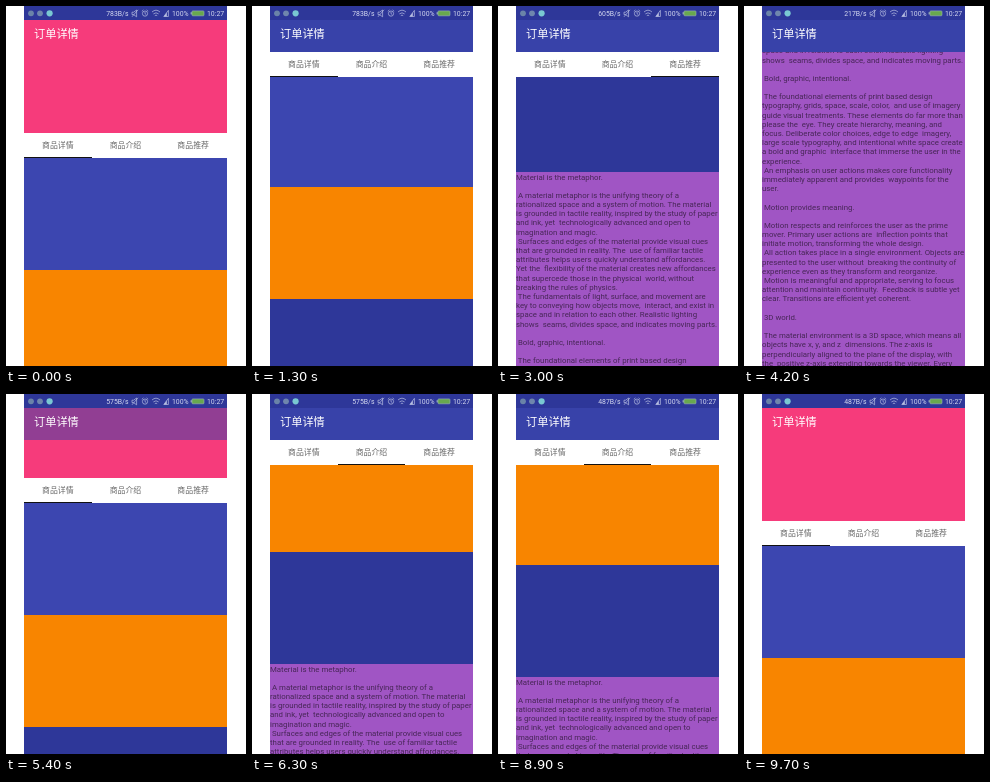
An HTML page for the animation above (9.8 s loop, 240 px wide and 360 px high).

```html
<!DOCTYPE html>
<html lang="zh-CN">
<head>
<meta charset="utf-8">
<title>订单详情</title>
<style>
html, body { margin: 0; width: 100%; height: 100%; overflow: hidden; background: #fff; }
#phone { position: absolute; left: 18px; top: 0; width: 203px; height: 360px; overflow: hidden; background: #fff;
  font-family: Roboto, "Noto Sans CJK SC", "Noto Sans CJK", sans-serif; }
#phone div, #phone pre, #phone svg { position: absolute; left: 0; margin: 0; }
#page { top: 0; width: 203px; will-change: transform; }
.block { width: 203px; height: 112px; }
#copy { top: 488px; width: 203px; height: 640px; padding-top: .5px; background: #a055c4; color: rgba(0, 0, 0, .56);
  font: 7.85px/9.18px Roboto, sans-serif; white-space: pre; }
#tabs { top: 0; width: 203px; height: 25px; background: #fff; }
#tabs span { position: absolute; top: 0; width: 67.67px; line-height: 25px; text-align: center; font-size: 7.9px; color: #666; }
#mark { top: 24px; width: 67.67px; height: 1px; background: #111; }
#bar { top: 14px; width: 203px; height: 32px; background: #3842a9; }
#title { top: 13px; height: 32px; line-height: 32px; text-indent: 10px; font-size: 11.2px; color: #fff; white-space: nowrap; }
#status { top: 0; width: 203px; height: 14px; background: #2e3799; }
#status text { font: 6.9px Roboto, sans-serif; fill: #d3d7ef; }
</style>
</head>
<body>
<div id="phone">
  <div id="page">
    <div class="block" style="top:14px;height:113px;background:#f63b7b"></div>
    <div class="block" style="top:152px;background:#3c46b0"></div>
    <div class="block" style="top:264px;background:#f88500"></div>
    <div class="block" style="top:376px;background:#2e3799"></div>
    <pre id="copy">Material is the metaphor.

 A material metaphor is the unifying theory of a
rationalized space and a system of motion. The material
is grounded in tactile reality, inspired by the study of paper
and ink, yet  technologically advanced and open to
imagination and magic.
 Surfaces and edges of the material provide visual cues
that are grounded in reality. The  use of familiar tactile
attributes helps users quickly understand affordances.
Yet the  flexibility of the material creates new affordances
that supercede those in the physical  world, without
breaking the rules of physics.
 The fundamentals of light, surface, and movement are
key to conveying how objects move,  interact, and exist in
space and in relation to each other. Realistic lighting
shows  seams, divides space, and indicates moving parts.

 Bold, graphic, intentional.

 The foundational elements of print based design
typography, grids, space, scale, color,  and use of imagery
guide visual treatments. These elements do far more than
please the  eye. They create hierarchy, meaning, and
focus. Deliberate color choices, edge to edge  imagery,
large scale typography, and intentional white space create
a bold and graphic  interface that immerse the user in the
experience.
 An emphasis on user actions makes core functionality
immediately apparent and provides  waypoints for the
user.

 Motion provides meaning.

 Motion respects and reinforces the user as the prime
mover. Primary user actions are  inflection points that
initiate motion, transforming the whole design.
 All action takes place in a single environment. Objects are
presented to the user without  breaking the continuity of
experience even as they transform and reorganize.
 Motion is meaningful and appropriate, serving to focus
attention and maintain continuity.  Feedback is subtle yet
clear. Transitions are efficient yet coherent.

 3D world.

 The material environment is a 3D space, which means all
objects have x, y, and z  dimensions. The z-axis is
perpendicularly aligned to the plane of the display, with
the  positive z-axis extending towards the viewer. Every
sheet of material occupies a single position along the
z-axis and has a  standard 1dp thickness.
 On the web, the z-axis is used for layering  and not for
perspective. The 3D world is emulated by manipulating
the  y-axis.

 Light and shadow.

 Within the material environment, virtual lights illuminate
the scene. Key lights create directional shadows, while
ambient light creates soft shadows from all angles.
 Shadows in the material environment are cast by these
two light sources.</pre>
  </div>
  <div id="tabs">
    <span style="left:0">商品详情</span><span style="left:67.67px">商品介绍</span><span style="left:135.33px">商品推荐</span>
    <div id="mark"></div>
  </div>
  <div id="bar"></div>
  <div id="title">订单详情</div>
  <svg id="status" width="203" height="14" viewBox="18 0 203 14">
    <circle cx="25" cy="7.3" r="2.9" fill="#6a83a8"/>
    <circle cx="34" cy="7.3" r="2.9" fill="#6f86ad"/>
    <circle cx="43.6" cy="7.3" r="3.1" fill="#79c8d2"/>
    <text id="speed" x="122.5" y="10.2" text-anchor="end"></text>
    <g fill="none" stroke="#b9c0e2" stroke-width=".7">
      <path d="M126 6.2h1.6l3-2.2v6.8l-3-2.2H126zM126 10.8l6-7"/>
      <circle cx="139" cy="7.6" r="2.6"/>
      <path d="M139 6v1.7l1.2.7M135.8 5.4l1.6-1.5M142.2 5.4l-1.6-1.5"/>
      <path d="M146 6q4-3.6 8 0M147.4 7.9q2.6-2.2 5.2 0M148.8 9.6q1.2-.9 2.4 0"/>
      <path d="M157.8 10.5h4.6V4.4z"/>
    </g>
    <path d="M157.8 10.5h3V6.6z" fill="#b9c0e2"/>
    <text x="166" y="10.2">100%</text>
    <rect x="186" y="4.9" width="12" height="4.9" rx=".8" fill="#68a84e" stroke="#9db5b4" stroke-width=".6"/>
    <rect x="184.6" y="6.2" width="1.2" height="2.2" fill="#9db5b4"/>
    <text x="201" y="10.2">10:27</text>
  </svg>
</div>
<script>
const LOOP = 9800, STEP = 100;
const PIN = 46, TAB_TOP = 127, TAB_W = 203 / 3;
const FADE = TAB_TOP - PIN, BLOCK = 112;
const TABS_GONE = FADE + 3 * BLOCK;
const section = i => FADE + i * BLOCK;

// Each drag or tab press: start, end, offset it arrives at
const MOVES = [
  [700, 1700, 128], [1700, 2100, 176], [2300, 3300, 362], [3500, 4500, 648],
  [4500, 5500, 26], [5500, 6400, 225],
  [7300, 7800, section(0)], [8100, 8600, section(1)], [8800, 9300, section(2)],
  [9400, 9700, 0]
];
const SPEEDS = [783, 605, 217, 575, 955, 487];
const SPEED_STEP = 1700;

const $ = id => document.getElementById(id);
const page = $("page"), tabs = $("tabs"), mark = $("mark"), bar = $("bar"), speed = $("speed");

const clamp = p => Math.min(1, Math.max(0, p));
const ease = p => p * p * (3 - 2 * p);

function offsetAt(t) {
  const y = MOVES.reduce((from, [start, end, to]) =>
    from + (to - from) * ease(clamp((t - start) / (end - start))), 0);
  return Math.round(y);
}

function draw(now) {
  const t = Math.floor((now % LOOP) / STEP) * STEP;
  const y = offsetAt(t);
  const tab = [1, 2].filter(i => y >= section(i)).length;
  page.style.transform = `translateY(${-y}px)`;
  tabs.style.transform = `translateY(${Math.max(PIN, TAB_TOP - y)}px)`;
  tabs.style.visibility = y > TABS_GONE ? "hidden" : "visible";
  mark.style.left = tab * TAB_W + "px";
  bar.style.opacity = clamp(y / FADE);
  speed.textContent = SPEEDS[Math.floor(t / SPEED_STEP)] + "B/s";
}

const start = performance.now();
function tick() {
  draw(performance.now() - start);
  requestAnimationFrame(tick);
}
tick();
</script>
</body>
</html>
```
